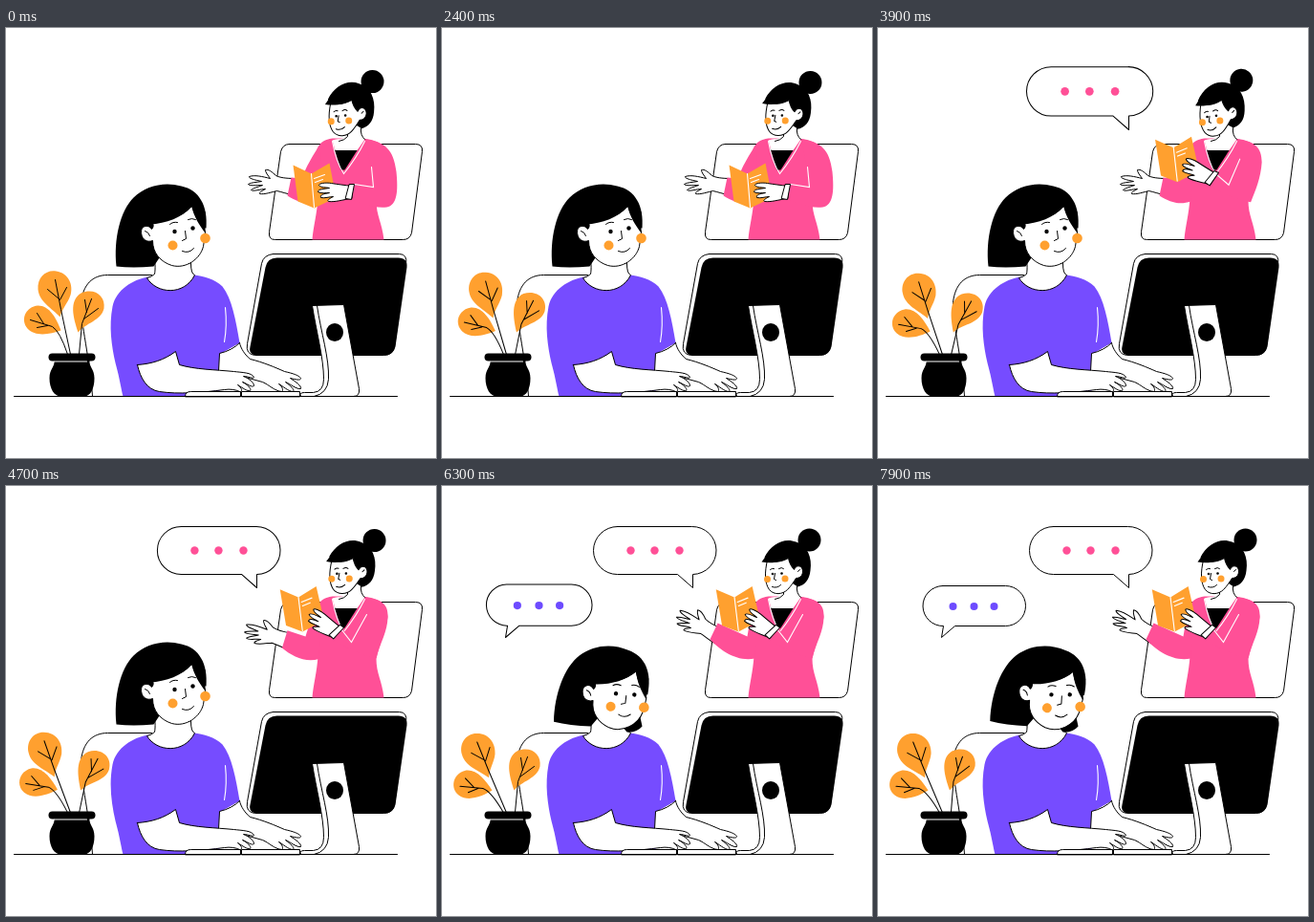
Animation of 450x450 px, one loop 8000 ms. Source, as an HTML page:

```html
<!DOCTYPE html>
<html lang="en">
<head>
<meta charset="utf-8">
<title>Online lesson</title>
<style>
html, body { margin: 0; width: 100%; height: 100%; overflow: hidden; background: #fff; }
svg { display: block; width: 100vw; height: 100vh; }
.line { fill: none; stroke: #000; stroke-width: 1; stroke-linecap: round; stroke-linejoin: round; }
.skin { fill: #fff; stroke: #000; stroke-width: 1; stroke-linecap: round; stroke-linejoin: round; }
.pink { fill: #ff5097; }
.purple { fill: #764cff; }
.dots { fill: #6d4bff; }
.orange { fill: #ffa02f; }
.white { fill: none; stroke: #fff; stroke-width: 1.1; stroke-linecap: round; }
</style>
</head>
<body>
<svg viewBox="-0.5 -0.5 450 450">
  <!-- chair -->
  <path class="line" d="M90 385C88 350 77 305 78 287C80 268 90 258 106 258H152"/>

  <!-- plant -->
  <g id="leafLeft">
    <path class="orange" d="M57 316C46 320 30 323 22 314C14 305 20 291 33 290C45 290 52 303 57 316Z"/>
    <path class="line" d="M25 305L48 312Q56 317 64 341M39 309L32 298M43 311L32 313"/>
  </g>
  <g id="leafTop">
    <path class="orange" d="M56 302C48 293 34 286 33 273C32 260 42 252 52 254C65 256 70 268 67 279C64 288 58 293 56 302Z"/>
    <path class="line" d="M51 263L57 294L67 341M55 283L43 273M56 284L63 271"/>
  </g>
  <g id="leafRight">
    <path class="orange" d="M75 318C70 303 65 285 78 277C92 271 104 280 102 293C99 306 83 308 75 318Z"/>
    <path class="line" d="M89 283L79 309L76 341M84 297L82 284M81 304L96 293"/>
  </g>
  <rect x="44" y="340" width="49" height="8" rx="4"/>
  <path d="M50 347C51 354 45 356 45 366C45 377 50 385 57 385H81C88 385 92 377 92 366C92 356 86 354 87 347Z"/>
  <path class="white" d="M50 348.5H84"/>

  <!-- call window and teacher -->
  <path class="skin" d="M296 121H428Q436 121 435 129L424 214Q422 221 415 221H281Q274 221 275 213L287 129Q289 121 296 121Z"/>
  <path class="pink" d="M341 115C333 116 329 119 326 124C319 137 327 155 326 177C325 194 321 208 320 221H395C393 203 387 196 387 180C391 163 399 152 399 136C398 122 390 117 373 115Z"/>
  <path d="M343 126H368L354 148H350Z"/>
  <path d="M356 104V112C352 117 346 115 341 117L344 127.5H367L375 116C372 114 371 110 371 98Z" fill="#fff"/>
  <path class="line" d="M357 108V113Q354 117 348 118M371 104Q370 112 375 116"/>
  <path class="white" d="M341 118Q345 140 353 152Q366 136 375 118"/>
  <g id="teacherHead">
    <circle cx="384" cy="56" r="12"/>
    <path d="M337 74C344 60 358 53 370 58C382 62 387 74 385 88C384 98 379 103 372 105L356 95L345 80Z"/>
    <path class="skin" d="M340 77C337 90 337 101 342 108C347 114 356 113 361 108C365 104 368 99 370 96C377 96 379 88 375 84C371 82 369 85 368 87C365 84 363 80 362 75C355 79 347 80 340 77Z"/>
    <path d="M334 79C345 81 357 79 363 73L368 86L374 76L360 60L344 65Z"/>
    <path class="line" d="M343 87Q345 85 347 86M352 86Q355 84 357 86M348 91L347 97L349 98M345 105Q350 107 354 103M372 89L374 87"/>
    <circle cx="345.5" cy="91.5" r="1.3"/><circle cx="355" cy="91" r="1.3"/>
    <circle class="orange" cx="340" cy="97" r="3.5"/><circle class="orange" cx="358.5" cy="96.5" r="3.5"/>
  </g>
  <g id="openHand">
    <path class="skin" d="M302 159C292 159 286 158 282 156C278 152 274 149 271 150C271 153 274 156 276 159C268 157 260 155 254 157C253 159 262 161 267 162C262 163 256 163 253 165C254 167 262 166 268 166C263 168 258 169 256 171C258 173 266 170 271 170C267 172 264 174 265 175C270 176 278 173 283 172C288 173 293 175 299 176Z"/>
  </g>
  <path class="pink" id="sleeveLeft"/>
  <path class="pink" id="sleeveRight"/>
  <path class="white" id="armLine"/>
  <g id="book">
    <path class="orange" d="M300 143L319 152L322 188L305 181Z"/>
    <path class="orange" d="M319 152L338 141L345 177L322 188Z"/>
    <path class="white" d="M319 152L322 187M322 157L333 153M323 161L331 158"/>
  </g>
  <g id="bookHand">
    <path class="skin" d="M362 165C354 164 346 163 340 162C334 161 327 162 327 164C329 167 335 166 338 167C332 168 326 168 326 171C329 173 334 172 338 172C332 173 328 174 329 177C333 178 338 176 342 176C338 178 335 180 337 181C344 182 352 179 361 178Z"/>
    <path class="skin" d="M359 163L364 163L361 179L355 178Z"/>
  </g>

  <!-- student -->
  <path class="purple" d="M148 260C132 263 115 273 111 291C107 312 110 332 114 350C119 368 120 378 122 385H223V341L244 329C240 305 236 283 226 270C218 262 206 259 196 258Z"/>
  <path class="skin" d="M153 232C156 243 156 252 155 257Q152 260 147 261C157 278 186 280 197 258Q193 257 193 246Z"/>
  <path class="white" d="M229 292Q231 311 228 328"/>
  <path d="M244 329C245 335 250 342 255 346C268 349 282 355 291 359C300 361 306 363 308 366C308 369 302 367 297 366C303 370 309 374 308 377C304 378 297 372 292 370C297 374 302 378 300 380C295 380 289 374 285 372C289 375 290 379 288 380C280 379 275 373 268 370C253 366 237 361 222 359L223 340Q236 337 244 329Z" class="skin"/>
  <path class="skin" d="M137 352C140 366 147 378 160 380C180 383 205 381 228 378C234 377 240 378 244 380C248 380 246 376 242 373C247 376 252 380 255 379C257 377 251 372 247 370C252 372 257 376 259 374C259 370 253 366 248 364C253 364 258 367 259 365C257 360 246 360 238 359C218 357 198 357 181 352L177 338C165 347 152 351 137 352Z"/>
  <path id="hairTip" d="M205 232L209 251Q203 258 193 257L184 246Z"/>
  <g id="studentHead">
    <path d="M115 249C112 220 119 191 133 177C146 164 166 160 183 165C202 169 211 186 209 209L185 205L160 240L154 249Q132 251 115 249Z"/>
    <path class="skin" d="M153 203C154 206 154 208 152 210C148 204 140 207 141 214C142 222 148 224 153 222C153 235 161 244 173 248C188 252 203 241 206 228C207 221 208 217 208 212C202 204 197 196 194 186C185 196 168 202 153 203Z"/>
    <path d="M150 205C167 204 184 198 194 186C196 197 202 206 208 214L208 192L190 170L155 180Z"/>
    <path class="line" d="M145 212Q149 213 150 217"/>
    <g id="studentFace">
      <path class="line" d="M171 205Q174 202 179 203M190 200Q194 198 198 200M187 212L188 220L184 222M184 233Q191 236 196 230"/>
      <circle cx="176" cy="212.5" r="2.2"/><circle cx="195" cy="209" r="2.2"/>
      <circle class="orange" cx="174" cy="227" r="5"/><circle class="orange" cx="208" cy="219.5" r="5.3"/>
    </g>
  </g>

  <!-- computer and desk -->
  <path class="skin" d="M279 236H411Q420 236 418 247L406 333Q404 342 395 342H260Q250 341 252 330L267 246Q269 237 279 236Z"/>
  <path d="M283 240H410Q420 240 419 250L407 333Q405 342 396 342H263Q253 342 255 333L271 250Q273 240 283 240Z"/>
  <path class="skin" d="M320 290L353 289L369 377Q370 385 363 385H308Q306 381 312 381H321Q332 380 332 367C332 345 324 316 320 290Z"/>
  <path class="line" d="M325 290C329 318 338 345 337 367Q336 382 322 385"/>
  <ellipse cx="343.5" cy="318" rx="9" ry="9.5"/>
  <path class="skin" d="M187 385Q187 380 193 380H245V385ZM246 385V380H307V385Z"/>
  <path class="line" d="M8 385H409"/>

  <!-- speech bubbles -->
  <g id="bubbleOne">
    <path class="skin" d="M183 42H261A25 25 0 0 1 262 92L262 106L246 92H183A25 25 0 0 1 183 42Z"/>
    <g class="pink"><circle cx="197" cy="67" r="4.2"/><circle cx="222" cy="67" r="4.2"/><circle cx="248" cy="67" r="4.2"/></g>
  </g>
  <g id="bubbleTwo">
    <path class="skin" d="M67 104H133A21 21 0 0 1 133 146H80L66 158L68 146A21 21 0 0 1 67 104Z"/>
    <g class="dots"><circle cx="78" cy="125.5" r="4"/><circle cx="100" cy="125.5" r="4"/><circle cx="121" cy="125.5" r="4"/></g>
  </g>
</svg>
<script>
const LOOP = 8000, STEP = 100;
const el = id => document.getElementById(id);
const move = (id, value) => el(id).setAttribute("transform", value);

// Each track is a list of [time, value], joined by smooth curves without overshoot.
const tracks = {
  leafLeft: [[0, 0], [900, -0.5], [2400, -3.5], [3900, -6.5], [4700, -8], [6300, -11.5], [7900, -11.5]],
  leafTop: [[0, 0], [900, -1], [2400, -4.3], [3900, -6.5], [4700, -8.5], [6300, -11], [7900, -11]],
  leafRight: [[0, 0], [900, 0.5], [2400, 6], [3900, 8], [4700, 6.5], [6300, 0], [7900, -1]],
  nod: [[0, -1], [1100, -6.5], [2400, 1], [3500, -6], [3900, -4.2], [4800, 1.2], [5400, 0]],
  lift: [[2900, 0], [3900, 0.76], [4400, 1]],
  reach: [[3900, 0], [4700, 0.4], [5400, 1]],
  turn: [[4900, 0], [5900, 1], [6300, 1], [7700, 1.12]],
  look: [[4900, 0], [5900, 7], [6300, 7], [7700, 2.5]],
  pop: [[0, 0], [240, 1], [360, 1.11], [610, 0.95], [870, 1.05], [1080, 1]]
};

function at(keys, t) {
  const last = keys.length - 1;
  if (t <= keys[0][0]) return keys[0][1];
  if (t >= keys[last][0]) return keys[last][1];
  const slope = i => (keys[i + 1][1] - keys[i][1]) / (keys[i + 1][0] - keys[i][0]);
  const tangent = i => {
    if (i === 0 || i === last) return 0;
    const a = slope(i - 1), b = slope(i);
    return a * b <= 0 ? 0 : 2 * a * b / (a + b);
  };
  const i = keys.findIndex((k, n) => n < last && t < keys[n + 1][0]);
  const span = keys[i + 1][0] - keys[i][0], u = (t - keys[i][0]) / span;
  const ease = u * u * (3 - 2 * u);
  return keys[i][1] + (keys[i + 1][1] - keys[i][1]) * ease
    + span * u * (1 - u) * ((1 - u) * tangent(i) - u * tangent(i + 1));
}

const lerp = (a, b, p) => a + (b - a) * p;

// Blends two paths that share the same commands.
function blend(a, b, p) {
  const ends = b.match(/[\d.]+/g);
  let i = 0;
  return a.replace(/[\d.]+/g, n => lerp(+n, +ends[i++], p).toFixed(2));
}

const poses = {
  sleeveLeft: ["M330 119 C320 133 313 146 309 157 L298 156 L294 175 C305 182 315 185 327 181 Z",
    "M330 119 C322 133 321 146 319 157 L288 143 L280 160 C290 171 308 184 327 180 Z"],
  sleeveRight: ["M376 116 C396 119 405 126 408 150 C410 170 409 185 398 187 C386 189 370 182 360 179 L363 163 C370 165 377 166 384 166 L380 140 Z",
    "M376 116 C392 118 400 123 399 137 C397 152 390 165 387 180 C377 178 360 172 341 160 L350 147 C354 152 358 157 362 162 L377 134 Z"],
  armLine: ["M382 145 L384 166 L364 163", "M377 134 L361 163 L350 149"]
};

function bubble(id, x, y, t) {
  const s = at(tracks.pop, t);
  el(id).style.display = s > 0 ? "" : "none";
  move(id, `translate(${x} ${y}) scale(${s}) translate(${-x} ${-y})`);
}

function draw(t) {
  const v = name => at(tracks[name], t);
  move("leafLeft", `rotate(${v("leafLeft")} 65 342)`);
  move("leafTop", `rotate(${v("leafTop")} 67 342)`);
  move("leafRight", `rotate(${v("leafRight")} 76 342)`);
  move("teacherHead", `rotate(${v("nod")} 358 112)`);

  const lift = v("lift"), reach = v("reach"), turn = v("turn");
  move("book", `translate(${-13 * lift} ${-36 * lift}) rotate(${-2 * lift} 322 165)`);
  move("bookHand", `translate(${-15 * lift} ${-19 * lift}) rotate(${32 * lift} 360 172)`);
  move("openHand", `translate(${-12 * reach} ${-2 - 11 * reach}) rotate(${21 * reach} 296 168)`);
  for (const id in poses) {
    el(id).setAttribute("d", blend(...poses[id], id === "sleeveLeft" ? reach : lift));
  }

  move("studentHead", `translate(0 ${4.5 * Math.min(turn, 1)}) rotate(${7 * turn} 175 258)`);
  move("studentFace", `translate(${-1.5 * turn} ${turn}) rotate(${v("look")} 191 223)`);
  const tuck = 14 * Math.max(0, 1 - turn);
  move("hairTip", `translate(${-tuck} ${-tuck})`);
  bubble("bubbleOne", 262, 106, t - 3640);
  bubble("bubbleTwo", 66, 158, t - 6040);
}

const start = performance.now();
function tick() {
  const t = (performance.now() - start) % LOOP;
  draw(Math.floor(t / STEP) * STEP);
  requestAnimationFrame(tick);
}
tick();
</script>
</body>
</html>
```
